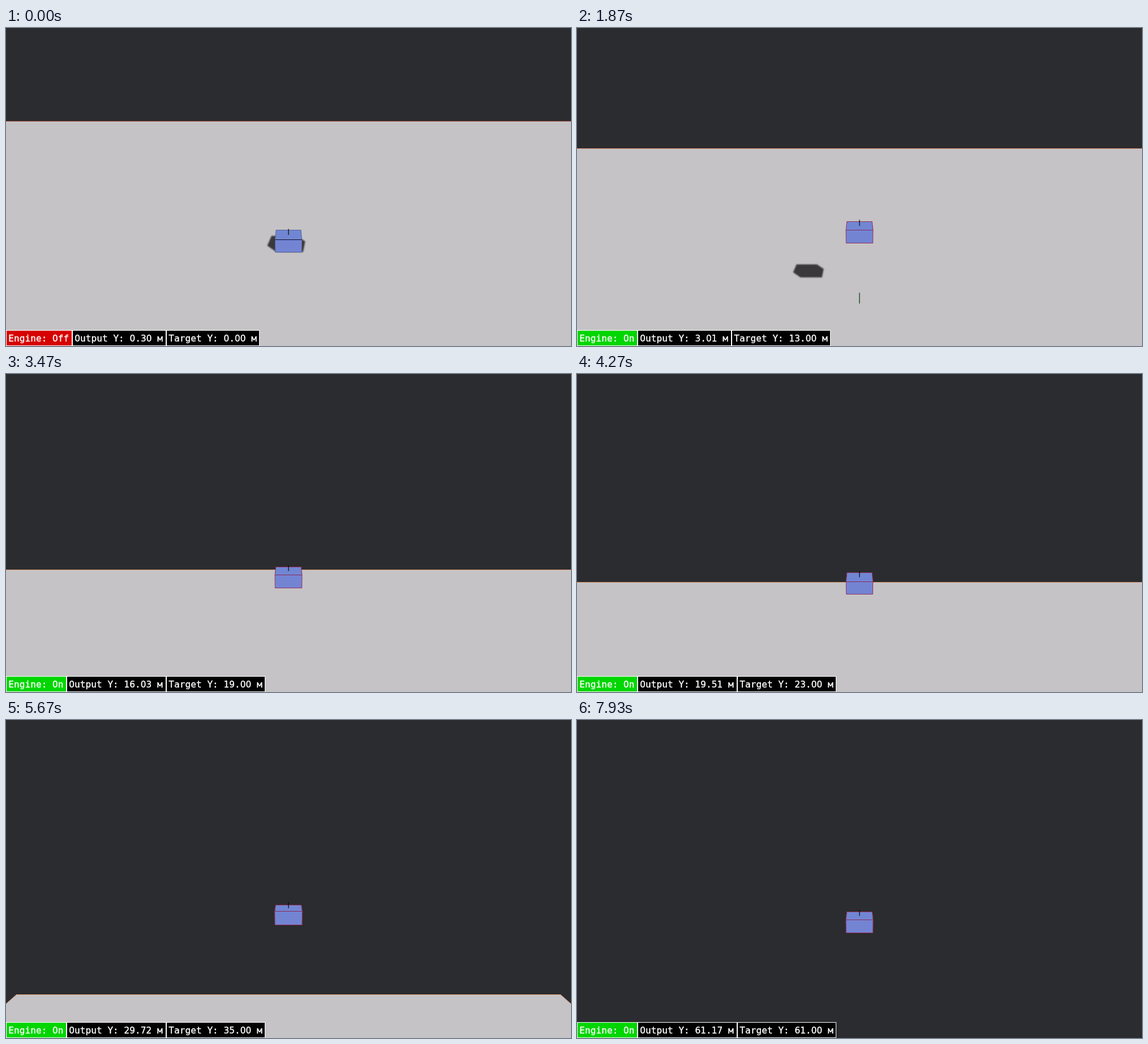
These frames come from a looping animation (998x561 px, 8000 ms). An HTML page:

```html
<!DOCTYPE html>
<html lang="en">
<head>
<meta charset="utf-8">
<title>Hover box</title>
<style>
html, body { margin: 0; width: 100%; height: 100%; overflow: hidden; background: #2b2c2f; }
svg { display: block; width: 100%; height: 100%; }
text { font: 16.16px "DejaVu Sans Mono", monospace; fill: #fff; stroke: #fff; stroke-width: 0.35; white-space: pre; }
.digit { font: 15.29px "DejaVu Sans", sans-serif; }
.panel rect { stroke: #fff; stroke-width: 1; }
</style>
</head>
<body>
<svg viewBox="0 0 998 561" preserveAspectRatio="none">
  <defs>
    <filter id="soft" x="-30%" y="-30%" width="160%" height="160%">
      <feGaussianBlur id="blur" stdDeviation="1"/>
    </filter>
  </defs>
  <rect width="998" height="561" fill="#2b2c2f"/>
  <path id="ground" fill="#c5c3c5"/>
  <path id="rim" fill="none"/>
  <polygon id="shadow" points="-27,2 -21,-12 15,-12 27,-4 24,11 -14,11" fill="#3b393b" filter="url(#soft)"/>
  <path id="origin" stroke="#123d1a" stroke-width="1.3"/>
  <polygon id="topFace" fill="#7186d3"/>
  <polygon id="frontFace" fill="#7384d3"/>
  <path id="ridge"/>
  <path id="axis" stroke="#08120e" stroke-width="1.3"/>
  <g class="panel"><rect y="533.5" height="27"/><text y="552.5"></text></g>
  <g class="panel"><rect y="533.5" height="27"/><text y="552.5"></text></g>
  <g class="panel"><rect y="533.5" height="27"/><text y="552.5"></text></g>
</svg>
<script>
const LOOP = 8000, STEP = 200 / 3, ENGINE_ON = 870, CX = 499, REST = 0.3;
const CHAR = 9.73, PAD = 10;

// Key moments of the climb: ms, height in m, speed in m/s, commanded height
const flight = [
  [1200, REST, 0, 0], [1870, 3.01, 6.8, 13], [2600, 9.05, 9.6, 16], [3470, 16.03, 7.6, 19],
  [5070, 22.99, 7.6, 27], [6470, 42.59, 16.8, 46], [7930, 61.17, 8.4, 61]
];

const $ = id => document.getElementById(id);
const panels = [...document.querySelectorAll(".panel")];
const lerp = (a, b, u) => a + (b - a) * u;
const snap = y => Math.floor(y) + 0.5;
const set = (id, attrs) => {
  for (const k in attrs) $(id).setAttribute(k, attrs[k]);
};

// Cubic motion between two key moments; speed is its derivative
function stateAt(ms) {
  const t = Math.max(ms, flight[0][0]);
  let i = 0;
  while (i < flight.length - 2 && t >= flight[i + 1][0]) i++;
  const [a, p, v, from] = flight[i], [b, q, w, to] = flight[i + 1];
  const s = (b - a) / 1000, u = (t - a) / (b - a), r = 1 - u;
  return {
    h: p * (1 + 2 * u) * r * r + q * u * u * (3 - 2 * u) + s * u * r * (v * r - w * u),
    v: 6 * u * r * (q - p) / s + v * r * (1 - 3 * u) + w * u * (3 * u - 2),
    goal: Math.floor(lerp(from, to, u) + 1e-6)
  };
}

// The camera trails the box, so speed shifts everything on screen
function drawGround(rise, v) {
  const y = snap(164 + 13.8 * rise ** 0.9 + 2.2 * v);
  const half = 494 - 2 * (rise - 22.7);
  const left = Math.max(0, CX - half), right = 998 - left;
  const side = y + left * (y - 60) / half;
  const edge = `M0 ${side}L${left} ${y}H${right}L998 ${side}`;
  const u = Math.min(1, rise / 9);
  const color = [[160, 220], [80, 150], [62, 110]].map(([a, b]) => Math.round(lerp(a, b, u)));
  const visible = y < 561;
  set("ground", { d: visible ? edge + "V900H0Z" : "" });
  set("rim", { d: visible ? edge : "", stroke: `rgb(${color})` });
}

function drawShadow(rise, v) {
  const size = 1 / (0.807 + 0.071 * rise);
  const x = CX - 4 - 430 * rise / (10.8 + rise);
  const y = 381.5 + 12.8 * rise + 1.9 * v;
  set("shadow", { transform: `translate(${x} ${y}) scale(${size})` });
  set("blur", { stdDeviation: Math.min(3, 0.7 + rise * 0.2) });
  const base = 384 + rise * 37.6;
  set("origin", { d: `M${CX} ${base - 19}V${base}` });
}

function drawBox(v, on) {
  const front = 373.4 - 2.5 * v;
  const low = front - 331;
  const y = snap(front);
  const top = snap(front - 10.5 - low * 0.155);
  const bottom = snap(front + 24.4 - low * 0.065);
  const half = 24.4 - low * 0.02, back = half - 1.6;
  const mid = (top + y) / 2;
  const stroke = on ? "#96305f" : "#56629f";
  const face = (y1, w1, y2, w2) => [CX - w1, y1, CX + w1, y1, CX + w2, y2, CX - w2, y2].join(" ");
  set("topFace", { points: face(top, back, y, half), stroke });
  set("frontFace", { points: face(y, half, bottom, half - 0.3), stroke });
  set("ridge", { d: `M${CX - half} ${y}H${CX + half}`, stroke: on ? "#8c2a58" : "#10101c" });
  set("axis", { d: `M${CX} ${mid - 10.5}V${mid}` });
}

function drawPanels(items) {
  let end = 0;
  items.forEach(([label, fill], i) => {
    const [rect, text] = panels[i].children;
    const x = Math.round(end);
    end += label.length * CHAR + PAD;
    rect.setAttribute("x", x + 0.5);
    rect.setAttribute("width", Math.round(end) - x - 1);
    rect.setAttribute("fill", fill);
    text.setAttribute("x", x + 4.3);
    if (text.textContent !== label) {
      text.innerHTML = label.replace(/\d+/g, '<tspan class="digit">$&</tspan>');
    }
  });
}

function draw(ms) {
  const t = Math.round(Math.floor((ms + 4) / STEP) * STEP / 10) * 10;
  const on = t >= ENGINE_ON;
  const { h, v, goal } = stateAt(t);
  const rise = Math.max(0, h - REST);
  drawGround(rise, v);
  drawShadow(rise, v);
  drawBox(v, on);
  drawPanels([
    ["Engine: " + (on ? "On" : "Off"), on ? "#00d600" : "#d60000"],
    [`Output Y: ${h.toFixed(2)} м`, "#000"],
    [`Target Y: ${goal.toFixed(2)} м`, "#000"]
  ]);
}

const start = performance.now();
function tick() {
  draw((performance.now() - start) % LOOP);
  requestAnimationFrame(tick);
}
tick();
</script>
</body>
</html>
```
